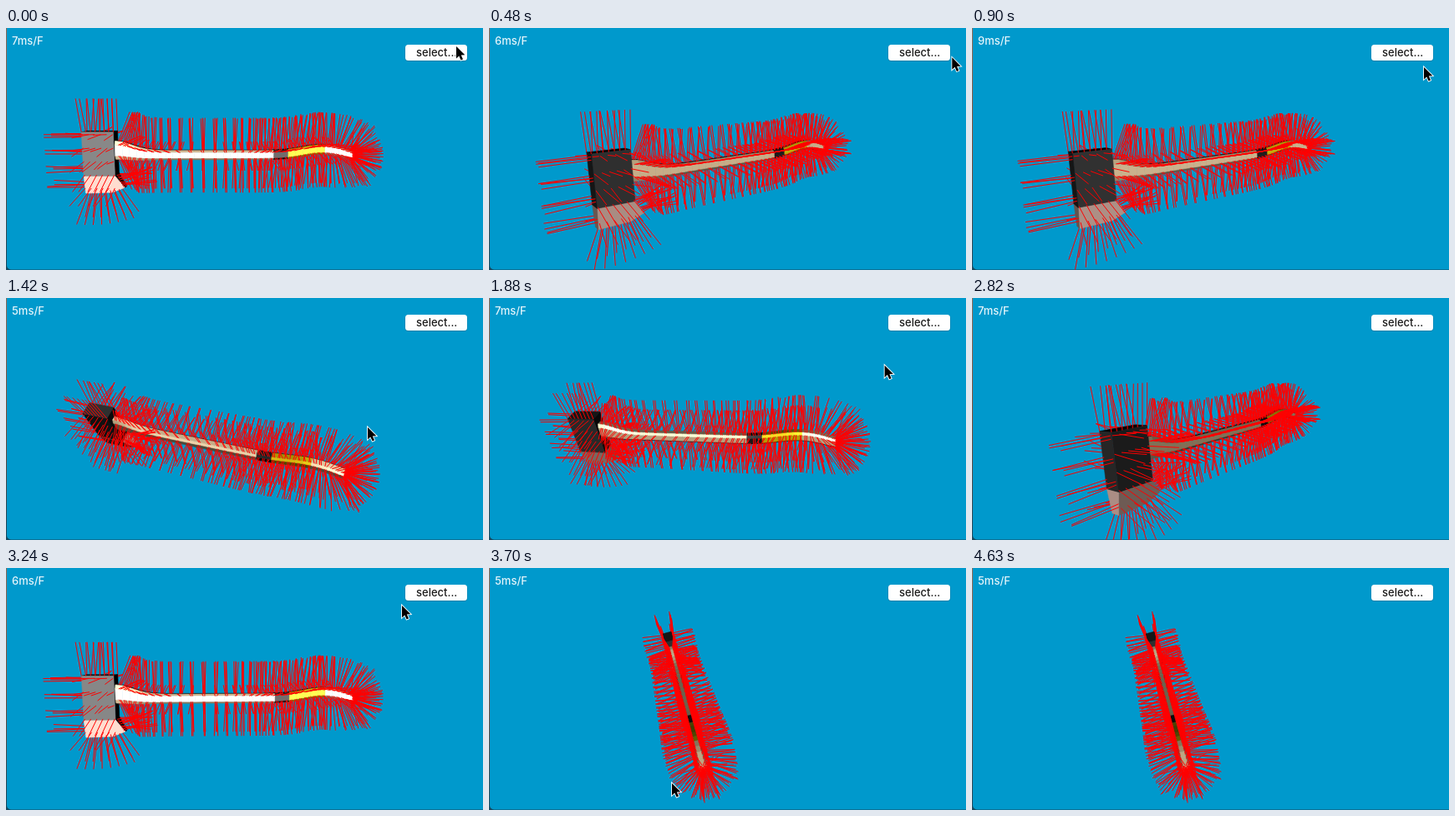
These frames come from a looping animation (571 by 290 pixels, 4.75 s). An HTML page with a canvas:

```html
<!DOCTYPE html>
<html lang="en">
<head>
<meta charset="utf-8">
<title>Axe with normals</title>
<style>
html, body { margin: 0; width: 100%; height: 100%; overflow: hidden; background: #0099cc; }
canvas { display: block; }
</style>
</head>
<body>
<canvas id="stage" width="571" height="290"></canvas>
<script>
const ctx = document.getElementById('stage').getContext('2d');
const LOOP = 4750, STEP = 58, EYE = 430, SPIKE = 39, RAD = Math.PI / 180;
const WOOD = [255, 222, 172], STEEL = [52, 52, 52], EDGE = [255, 210, 195];
const BAND = [30, 25, 25], YELLOW = [255, 215, 0];

// Poses: [x, y, depth, yaw, pitch, tilt]. A turn swings the head towards the viewer.
const turn = (yaw, y = 154 + yaw / 10) => [255 + yaw, y, 0, yaw, 8 + yaw / 40, -yaw / 13];
const ABOVE = [238, 174, 0, -35, 55, -18];
const END_ON = [232, 148, 120, -90, 35, -15];

// The axe rests in a pose between arrive and leave; the cursor drags it to the next.
const key = (arrive, leave, pose, mouse, ms) => ({ arrive, leave, ms, values: [...pose, ...mouse] });
const keys = [
  key(0, 0, turn(0, 150), [539, 22], 7),
  key(120, 240, turn(10), [541, 26], 6),
  key(600, 600, turn(46), [561, 40], 8),
  key(900, 900, turn(33), [541, 47], 9),
  key(1420, 1480, ABOVE, [433, 155], 5),
  key(2230, 2230, turn(-3), [521, -6], 6),
  key(2470, 2590, turn(14), [540, -40], 6),
  key(2820, 2880, turn(50), [540, -200], 7),
  key(3240, 3240, turn(1), [474, 45], 6),
  key(3700, 3750, END_ON, [219, 258], 5),
  key(4210, 4629, END_ON, [506, 102], 5),
  key(4630, LOOP, END_ON, [506, -40], 5),
];

let seed = 7;
const jitter = amount => {
  seed = (seed * 16807) % 2147483647;
  return (seed / 2147483647 * 2 - 1) * amount;
};
const dot = (a, b) => a[0] * b[0] + a[1] * b[1] + a[2] * b[2];
const minus = (a, b) => a.map((v, i) => v - b[i]);
const unit = a => a.map(v => v / Math.hypot(...a));
const cross = (a, b) => [a[1] * b[2] - a[2] * b[1], a[2] * b[0] - a[0] * b[2], a[0] * b[1] - a[1] * b[0]];
const mean = pts => [0, 1, 2].map(i => pts.reduce((sum, p) => sum + p[i], 0) / pts.length);
const bump = (x, center, width) => Math.exp(-(((x - center) / width) ** 2));

// Model: x along the handle, y down, z towards the viewer.
const HEAD_LEFT = -160, HEAD_RIGHT = -123, TAIL = 159;
const faces = [], spikes = [];

function addFace(points, color, inside) {
  const center = mean(points);
  let normal = unit(cross(minus(points[1], points[0]), minus(points[2], points[0])));
  if (dot(normal, minus(center, inside)) < 0) normal = normal.map(v => -v);
  faces.push({ points, color, center, normal });
}
function addSpike(point, direction, length = SPIKE) {
  spikes.push({ point, normal: unit(direction), length });
}

function prism(outline, color) {
  const back = outline.map(([x, y, z]) => [x, y, -z]);
  const inside = mean([...outline, ...back]);
  addFace(outline, color, inside);
  addFace(back, color, inside);
  outline.forEach((p, i) => {
    const j = (i + 1) % outline.length;
    addFace([p, outline[j], back[j], back[i]], color, inside);
  });
}

// The handle is an octagonal tube along a curved axis, thicker at the head.
const axisY = x => 2 - 6 * bump(x, HEAD_RIGHT, 25) - 7 * bump(x, 122, 32) + 2 * bump(x, TAIL, 12);
const halfHeight = x => 5.8 + 5.7 * bump(x, HEAD_RIGHT, 30) - bump(x, TAIL, 8);
const squared = v => Math.sign(v) * Math.abs(v) ** .6;
const section = Array.from({ length: 8 }, (_, n) => {
  const angle = (n + .5) * 45 * RAD;
  return [squared(Math.cos(angle)), squared(Math.sin(angle))];
});
const ring = x => section.map(([a, b]) => [x, axisY(x) + a * halfHeight(x), b * 5]);
const handleColor = x => x > 66 && x < 83 ? BAND : x > 83 && x < 122 ? YELLOW : WOOD;

function buildHandle() {
  const length = (TAIL - HEAD_RIGHT) / 33;
  for (let i = 0; i < 33; i++) {
    const x = HEAD_RIGHT + i * length, from = ring(x), to = ring(x + length);
    const middle = x + length / 2;
    for (let n = 0; n < 8; n++) {
      const m = (n + 1) % 8;
      addFace([from[n], to[n], to[m], from[m]], handleColor(middle), [middle, axisY(middle), 0]);
    }
  }
  addFace(ring(TAIL), WOOD, [TAIL - 10, axisY(TAIL), 0]);

  for (let x = HEAD_RIGHT + 4; x < TAIL; x += 5.5 + 9 * bump(x, -30, 50)) {
    const lean = .5 * bump(x, HEAD_RIGHT, 18) + .8 * bump(x, TAIL, 16);
    const spread = x > 60 ? .16 : .05;
    for (const twin of [x, x + 1.8]) {
      ring(twin).forEach((p, n) => {
        const [a, b] = section[n], steep = Math.abs(a) > Math.abs(b);
        addSpike(p, [lean + jitter(spread), steep ? a : a * .35, steep ? b * .35 : b]);
      });
    }
  }
  for (let n = 0; n < 56; n++) {
    const around = n * 137.5 * RAD, out = Math.sqrt((n + .5) / 60);
    const dy = Math.cos(around) * out, dz = Math.sin(around) * out;
    addSpike([TAIL, axisY(TAIL) + dy * 5, dz * 4], [Math.sqrt(1 - out * out), dy, dz], 34);
  }
}

function buildHead() {
  const top = -26, seam = 26, bottom = 48, thick = 9, thin = 5;
  prism([[HEAD_LEFT, top, thick], [HEAD_RIGHT, top, thick], [HEAD_RIGHT, seam, thick], [HEAD_LEFT, seam, thick]], STEEL);
  prism([[HEAD_LEFT, seam, thick], [HEAD_RIGHT, seam, thick], [-113, 41, thin], [-128, 47, thin], [HEAD_LEFT, bottom, thin]], EDGE);
  for (const side of [-1, 1]) {
    for (let i = 0; i < 8; i++) {
      const x = HEAD_LEFT + i * 5.3, y = top + 3 + Math.floor(i / 2) * 20;
      addSpike([x, top, side * thick], [jitter(.1), -1, side * .12]);
      addSpike([x + 3, bottom - i * .7, side * thin], [-.35 + i * .13, 1, side * .25]);
      addSpike([HEAD_LEFT, y + i % 2 * 3, side * 7], [-1, jitter(.06), side * .05], 44);
      addSpike([-122 + i, seam + i * 2, side * thin], [1, -.2 + jitter(.3), side * .3]);
    }
    for (let n = 0; n < 30; n++) {
      const y = top + 3 + Math.floor(n / 6) * 16;
      addSpike([HEAD_LEFT + 1 + n % 6 * 7, y, side * 8], [jitter(.12), y > 20 ? .3 : jitter(.15), side]);
    }
  }
}
buildHandle();
buildHead();

function rotator(yaw, pitch, tilt) {
  const [cy, cp, ct] = [yaw, pitch, tilt].map(a => Math.cos(a * RAD));
  const [sy, sp, st] = [yaw, pitch, tilt].map(a => Math.sin(a * RAD));
  return ([x, y, z]) => {
    const x1 = x * cy + z * sy, z1 = z * cy - x * sy;
    const y1 = y * cp + z1 * sp;
    return [x1 * ct - y1 * st, x1 * st + y1 * ct, z1 * cp - y * sp];
  };
}

function shade(color, facing) {
  const diffuse = facing ** 1.5, glint = 95 * facing ** 12;
  return `rgb(${color.map(c => Math.min(255, Math.round(c * diffuse + glint)))})`;
}

function drawAxe([cx, cy, depth, yaw, pitch, tilt]) {
  const rotate = rotator(yaw, pitch, tilt), eye = [0, 0, EYE + depth];
  const project = ([x, y, z]) => {
    const scale = EYE / (EYE + depth - z);
    return [cx + x * scale, cy + y * scale];
  };
  const isFront = ({ p, n }) => dot(n, minus(eye, p)) > 0;
  const drawSpikes = list => {
    ctx.beginPath();
    for (const { p, n, length } of list) {
      ctx.moveTo(...project(p));
      ctx.lineTo(...project(p.map((v, i) => v + n[i] * length)));
    }
    ctx.strokeStyle = '#f00';
    ctx.lineWidth = 1;
    ctx.stroke();
  };
  const turned = spikes.map(s => ({ p: rotate(s.point), n: rotate(s.normal), length: s.length }));

  drawSpikes(turned.filter(s => !isFront(s)));
  faces.map(f => ({ ...f, p: rotate(f.center), n: rotate(f.normal) }))
    .filter(isFront)
    .sort((a, b) => a.p[2] - b.p[2])
    .forEach(f => {
      ctx.beginPath();
      f.points.forEach(p => ctx.lineTo(...project(rotate(p))));
      ctx.closePath();
      ctx.fillStyle = ctx.strokeStyle = shade(f.color, Math.max(0, f.n[2]));
      ctx.lineWidth = .6;
      ctx.fill();
      ctx.stroke();
    });
  drawSpikes(turned.filter(isFront));
}

function roundBox(x, y, w, h, radius, color) {
  ctx.fillStyle = color;
  ctx.beginPath();
  ctx.roundRect(x, y, w, h, radius);
  ctx.fill();
}

function drawWindow() {
  const border = ctx.createLinearGradient(0, 0, 0, 290);
  border.addColorStop(0, '#8c6a58');
  border.addColorStop(.5, '#7a4a36');
  border.addColorStop(1, '#16485f');
  ctx.fillStyle = border;
  ctx.fillRect(0, 0, 571, 290);
  roundBox(1, -10, 590, 299.4, 5, '#0099cc');
}

function drawControls(ms) {
  ctx.font = '500 13px Inter, sans-serif';
  ctx.fillStyle = '#e4f4fa';
  ctx.fillText(ms + 'ms/F', 7, 20);
  roundBox(477.5, 20, 75, 20, 4, '#0880aa');
  roundBox(478, 20, 74, 19, 3.5, '#fff');
  ctx.fillStyle = '#1a1a1a';
  ctx.fillText('select...', 491, 34);
}

function drawCursor(x, y) {
  const arrow = [[0, 0], [0, 14.5], [3.3, 11.4], [5.6, 16.6], [8, 15.6], [5.8, 10.6], [10.3, 10.3]];
  ctx.beginPath();
  arrow.forEach(([dx, dy]) => ctx.lineTo(x + dx, y + dy));
  ctx.closePath();
  ctx.strokeStyle = '#fff';
  ctx.lineWidth = 1.8;
  ctx.stroke();
  ctx.fillStyle = '#000';
  ctx.fill();
}

function draw(now) {
  const t = now % LOOP;
  const index = keys.findLastIndex(k => k.arrive <= t);
  const from = keys[index], to = keys[index + 1] || from;
  const span = to.arrive - from.leave;
  const steps = Math.max(1, Math.round(span / STEP));
  const step = t > from.leave ? Math.floor((t - from.leave) / span * steps) : 0;
  const values = from.values.map((v, i) => v + (to.values[i] - v) * step / steps);
  const moving = step > 0 && from.values[3] !== to.values[3];

  drawWindow();
  drawAxe(values);
  drawControls(moving ? 5 + (step * 3 + index) % 4 : from.ms);
  drawCursor(values[6], values[7]);
}

const start = performance.now();
function tick() {
  draw(performance.now() - start);
  requestAnimationFrame(tick);
}
tick();
</script>
</body>
</html>
```
